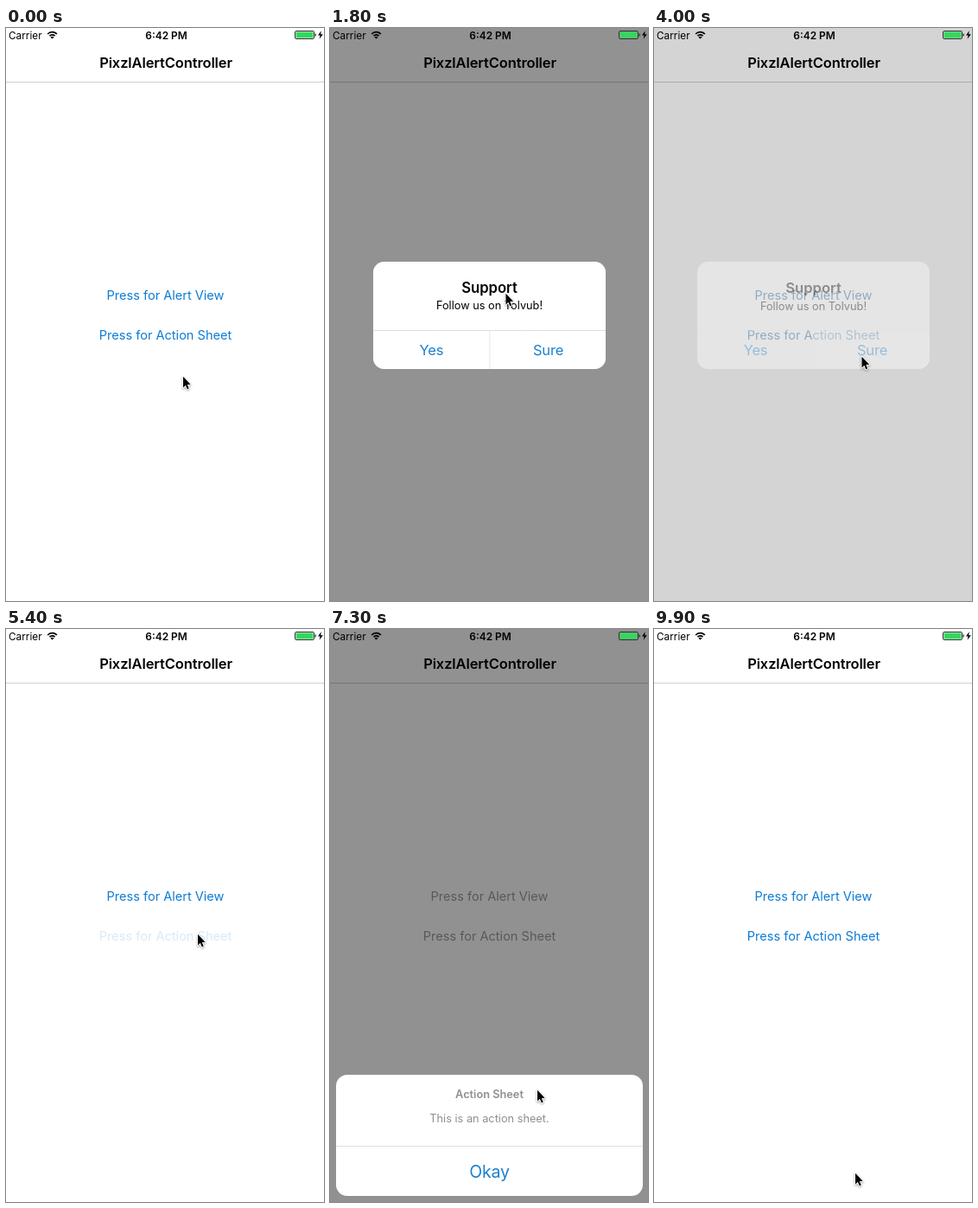
Animation of 368 by 662 pixels, one loop 10000 ms. Source, as an HTML page with a canvas:

```html
<!DOCTYPE html>
<html lang="en">
<head>
<meta charset="utf-8">
<title>Alert controller demo</title>
<style>
html, body { margin: 0; width: 100%; height: 100%; overflow: hidden; background: #fff; }
canvas { display: block; width: 368px; height: 662px; }
</style>
</head>
<body>
<canvas id="stage"></canvas>
<script>
const W = 368, H = 662, LOOP = 10000, STEP = 100;
const BLUE = [12, 124, 213], GRAY = [154, 154, 154], LINK = '#1c80cf';
const TINT_LAG = 25;
const canvas = document.getElementById('stage');
const ctx = canvas.getContext('2d');
const dpr = window.devicePixelRatio || 1;
canvas.width = W * dpr;
canvas.height = H * dpr;

// Pointer stops: time, x, y
const stops = [
  [0, 205, 402], [300, 135, 58], [600, 238, 44], [800, 238, 44],
  [1200, 203.5, 306], [1850, 203.5, 306], [2500, 241, 379], [2600, 241, 379],
  [2700, 240.5, 379], [4100, 240.5, 379], [4600, 245, 351], [4700, 245, 351],
  [5000, 222, 352], [6700, 222, 352], [7300, 240, 532], [7700, 233, 628]
];

const clamp = v => Math.max(0, Math.min(1, v));
const between = (t, a, b) => t >= a && t < b;

// Critically damped spring from 0 to 1
function spring(t, start) {
  const x = Math.max(0, t - start) * 0.017;
  return 1 - (1 + x) * Math.exp(-x);
}

const alertIn = t => spring(t, 1325);
const alertShown = t => alertIn(t) - spring(t, 3880);
const sheetShown = t => spring(t, 5500) - spring(t, 9102);
const dimming = t => clamp(alertShown(t) + sheetShown(t));

function pointerAt(t) {
  const i = stops.findIndex(s => s[0] > t);
  if (i < 0) return stops[stops.length - 1].slice(1);
  const [t0, x0, y0] = stops[i - 1], [t1, x1, y1] = stops[i];
  const u = (t - t0) / (t1 - t0), k = u * u * (3 - 2 * u);
  return [x0 + (x1 - x0) * k, y0 + (y1 - y0) * k];
}

function text(str, x, y, size, color, weight = 400, align = 'center', track = 0) {
  ctx.font = `${weight} ${size}px Inter, Roboto, sans-serif`;
  ctx.letterSpacing = `${track * size}px`;
  ctx.textAlign = align;
  ctx.fillStyle = color;
  ctx.fillText(str, x, y);
}

function rect(x, y, w, h, color) {
  ctx.fillStyle = color;
  ctx.fillRect(x, y, w, h);
}

function panel(x, y, w, h, r) {
  ctx.beginPath();
  ctx.roundRect(x, y, w, h, r);
  ctx.clip();
  rect(x, y, w, h, '#fff');
}

function polygon(points) {
  ctx.beginPath();
  points.forEach(([x, y]) => ctx.lineTo(x, y));
  ctx.closePath();
}

function link(str, y, tint, press) {
  const rgb = BLUE.map((c, i) => Math.round(c + (GRAY[i] - c) * tint));
  ctx.globalAlpha = 1 - 0.84 * press;
  text(str, 184.5, y, 14.55, `rgb(${rgb})`);
  ctx.globalAlpha = 1;
}

// Full press on touch, gradual return after release
function pressed(t, down, up) {
  return t < down ? 0 : 1 - clamp((t - up) / 450);
}

function drawPage(t) {
  const tint = dimming(t - TINT_LAG);
  rect(0, 0, W, H, '#fff');
  rect(0, 62, W, 1, '#cfcfcf');
  text('PixzlAlertController', 185, 46, 16.5, '#000', 600, 'center', -0.007);
  link('Press for Alert View', 314, tint, pressed(t, 1200, 1390));
  link('Press for Action Sheet', 360, tint, pressed(t, 5300, 5500));
  rect(0, 0, W, H, `rgba(0,0,0,${0.43 * dimming(t)})`);
}

function drawStatus() {
  text('Carrier', 3, 12.5, 11.8, '#000', 400, 'left');
  text('6:42 PM', 185.5, 12.5, 11.9, '#000', 600);

  ctx.strokeStyle = '#000';
  ctx.lineWidth = 1.7;
  for (const r of [4.2, 7.3]) {
    ctx.beginPath();
    ctx.arc(53.5, 12, r, -Math.PI * 0.76, -Math.PI * 0.24);
    ctx.stroke();
  }
  ctx.beginPath();
  ctx.moveTo(53.5, 12.6);
  ctx.arc(53.5, 12.6, 2.8, -Math.PI * 0.76, -Math.PI * 0.24);
  ctx.fillStyle = '#000';
  ctx.fill();

  ctx.lineWidth = 1;
  ctx.strokeStyle = '#333';
  ctx.beginPath();
  ctx.roundRect(334.5, 3.5, 22, 9, 1.5);
  ctx.stroke();
  rect(335.5, 4.5, 20, 7, '#35d65f');
  rect(357.5, 6.5, 1.3, 3, '#333');
  polygon([[364.8, 3.2], [361, 8.6], [363.6, 8.6], [362.6, 12.8], [366.8, 7.2], [364.2, 7.2]]);
  ctx.fillStyle = '#000';
  ctx.fill();
}

function drawAlert(t) {
  const alpha = alertShown(t);
  if (alpha < 0.004) return;
  const scale = 1 + 0.215 * (1 - alertIn(t));
  ctx.save();
  ctx.globalAlpha = alpha;
  ctx.translate(184.5, 332);
  ctx.scale(scale, scale);
  ctx.translate(-184.5, -332);
  panel(50, 270, 269, 124, 12.5);
  if (between(t, 3600, 4600)) rect(185, 350, 134, 44, '#e6e6e6');
  rect(50, 349, 269, 1, '#dedede');
  rect(184.5, 349, 0.7, 45, '#dedede');
  text('Support', 184.5, 306, 16.6, '#000', 600);
  text('Follow us on Tolvub!', 184.5, 325.5, 12.75, '#000');
  text('Yes', 117.5, 378, 16.5, LINK, 400, 'center', -0.012);
  text('Sure', 252.5, 378, 16.5, LINK, 400, 'center', -0.012);
  ctx.restore();
}

function drawSheet(t) {
  const show = sheetShown(t);
  if (show < 0.004) return;
  ctx.save();
  ctx.translate(0, 147 * (1 - show));
  panel(7, 515, 355, 140, 13);
  if (between(t, 8900, 9900)) rect(7, 598, 355, 57, '#e6e6e6');
  rect(7, 597, 355, 1, '#e0e0e0');
  text('Action Sheet', 184.5, 541.5, 12.75, '#8f8f8f', 600);
  text('This is an action sheet.', 184.5, 569.5, 12.75, '#8f8f8f');
  text('Okay', 184.5, 633.5, 19.6, LINK, 400, 'center', -0.012);
  ctx.restore();
}

function drawPointer(t) {
  const [x, y] = pointerAt(t);
  ctx.save();
  ctx.translate(x, y + 0.7);
  ctx.scale(0.88, 0.9);
  polygon([[0, 0], [0, 14.2], [3.2, 11.2], [5.4, 16.2], [7.6, 15.2], [5.5, 10.3], [9.8, 10.1]]);
  ctx.lineJoin = 'round';
  ctx.lineWidth = 2;
  ctx.strokeStyle = '#fff';
  ctx.shadowColor = 'rgba(0,0,0,.4)';
  ctx.shadowBlur = 2.5 * dpr;
  ctx.shadowOffsetY = dpr;
  ctx.stroke();
  ctx.shadowColor = 'transparent';
  ctx.fillStyle = '#000';
  ctx.fill();
  ctx.restore();
}

function draw(t) {
  ctx.setTransform(dpr, 0, 0, dpr, 0, 0);
  drawPage(t);
  drawStatus();
  drawAlert(t);
  drawSheet(t);
  drawPointer(t);
}

const start = performance.now();
function tick() {
  const t = (performance.now() - start) % LOOP;
  draw(Math.floor(t / STEP) * STEP);
  requestAnimationFrame(tick);
}
tick();
</script>
</body>
</html>
```
